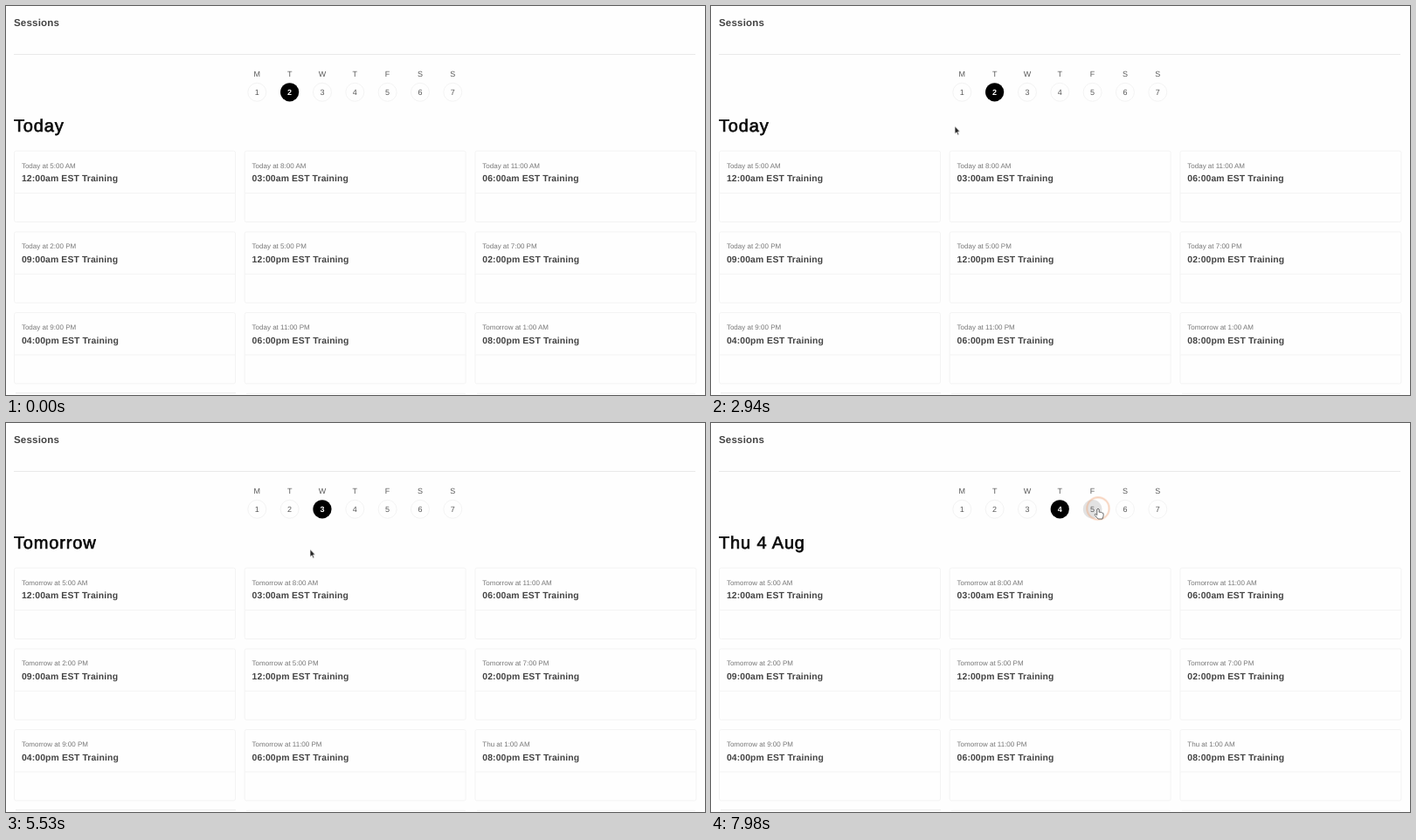
Write an HTML page that moves like this. It is 800x446 px and loops after 8 s.

```html
<!DOCTYPE html>
<html lang="en">
<head>
<meta charset="utf-8">
<title>Sessions</title>
<style>
html, body { margin: 0; width: 100%; height: 100%; overflow: hidden; background: #fefefe; }
svg {
  display: block; width: 100vw; height: 100vh;
  font-family: "Liberation Sans", Arial, sans-serif; text-rendering: geometricPrecision;
}
text { fill: currentColor; }
.title { font-size: 11.5px; font-weight: bold; letter-spacing: .2px; color: #444; }
.heading { font-size: 20px; letter-spacing: .85px; color: #0a0a0a; stroke: currentColor; stroke-width: .65px; }
.name { font-size: 10.4px; font-weight: bold; letter-spacing: .12px; color: #444; }
.time { font-size: 8px; color: #777; }
.day { font-size: 9px; color: #5a5a5a; text-anchor: middle; }
.on { font-weight: bold; color: #fff; }
.line { fill: none; stroke: #f3f3f3; }
.rule { stroke: #e9e9e9; }

/* One 8 s loop: 1% = 80 ms */
.show { animation: 8s step-end infinite; }
.today { animation-name: today; }
.tomorrow { animation-name: tomorrow; }
.thursday { animation-name: thursday; }
.early { animation-name: early; }
.late { animation-name: late; }
.arrow { animation-name: arrow; }
.hand { animation-name: hand; }
@keyframes today { 0% { opacity: 1 } 52.06%, to { opacity: 0 } }
@keyframes tomorrow { 0% { opacity: 0 } 52.06% { opacity: 1 } 78.31%, to { opacity: 0 } }
@keyframes thursday { 0% { opacity: 0 } 78.31%, to { opacity: 1 } }
@keyframes early { 0% { opacity: 1 } 61.2%, to { opacity: 0 } }
@keyframes late { 0% { opacity: 0 } 61.2%, to { opacity: 1 } }
@keyframes arrow {
  0% { opacity: 1 } 48.5% { opacity: 0 } 55% { opacity: 1 }
  75% { opacity: 0 } 80.9% { opacity: 1 } 97%, to { opacity: 0 }
}
@keyframes hand {
  0% { opacity: 0 } 48.5% { opacity: 1 } 55% { opacity: 0 }
  75% { opacity: 1 } 80.9% { opacity: 0 } 97%, to { opacity: 1 }
}

.hover { fill: #e2e2e2; opacity: 0; animation: 8s linear infinite; }
.hover3 { animation-name: hover3; }
.hover4 { animation-name: hover4; }
.hover5 { animation-name: hover5; }
@keyframes hover3 { 0%, 48.5% { opacity: 0 } 50%, 53% { opacity: 1 } 54%, to { opacity: 0 } }
@keyframes hover4 { 0%, 75% { opacity: 0 } 76.5%, 79% { opacity: 1 } 80%, to { opacity: 0 } }
@keyframes hover5 { 0%, 97% { opacity: 0 } 98.5%, to { opacity: 1 } }

.pointer { animation: move 8s ease-in-out infinite; }
@keyframes move {
  0%, 28.13% { transform: translate(230px, 460px) }
  36.75% { transform: translate(279px, 137.7px) }
  41.13%, 43.75% { transform: translate(300px, 128px) }
  49.88%, 54.25% { transform: translate(359.5px, 95.5px) }
  56.88%, 69.13% { transform: translate(348px, 144.7px) }
  76.13%, 79.63% { transform: translate(396px, 98px) }
  84.88%, 91.88% { transform: translate(410px, 146px) }
  98%, to { transform: translate(443px, 98px) }
}

.ring { fill: none; stroke: #f0a273; stroke-width: 1.8px; vector-effect: non-scaling-stroke; animation: ring 8s linear infinite; }
@keyframes ring {
  0%, 50.75% { transform: scale(.45); opacity: 0 }
  51.63% { transform: scale(.72); opacity: .5 }
  52.5%, 53.75% { transform: scale(1); opacity: .85 }
  55.13% { transform: scale(1); opacity: 0 }
  55.14%, 77% { transform: scale(.45); opacity: 0 }
  77.88% { transform: scale(.72); opacity: .5 }
  78.75%, 80% { transform: scale(1); opacity: .85 }
  81.38% { transform: scale(1); opacity: 0 }
  81.39%, 98.88% { transform: scale(.45); opacity: 0 }
  99.75%, to { transform: scale(.72); opacity: .5 }
}
</style>
</head>
<body>
<svg viewBox="0 0 800 446">
  <text class="title" x="9" y="22.7">Sessions</text>
  <path class="line rule" d="M9 55.5H789"/>
  <g id="week"></g>
  <text class="heading show today" x="9" y="143.5">Today</text>
  <text class="heading show tomorrow" x="9" y="143.5">Tomorrow</text>
  <text class="heading show thursday" x="9" y="143.5">Thu 4 Aug</text>
  <g id="cards"></g>
  <path class="line rule" d="M11 443.8H263"/>
  <path class="line" d="M275 444.3H526M539 444.3H789"/>
  <g class="pointer">
    <circle class="ring" r="17.6"/>
    <path class="show arrow" fill="#222" stroke="#fff" stroke-width=".7"
      d="M0 0V8.8L2 7L3.4 10.2L4.8 9.6L3.4 6.5H6Z"/>
    <path class="show hand" fill="#fff" stroke="#333" stroke-width=".7" stroke-linejoin="round"
      d="M-1.2 1Q0 -.8 1.2 1V4.3Q2.2 3.6 2.9 4.6Q3.9 4 4.6 5Q5.9 4.8 6.1 6V8.5L5 12H0L-3.8 7.4Q-3.6 5.9 -2.4 6.5L-1.2 7.6Z"/>
  </g>
</svg>
<script>
const label = (cls, x, y, str) => `<text class="${cls}" x="${x}" y="${y}">${str}</text>`;
const disc = (cls, x, r) => `<circle class="${cls}" cx="${x}" cy="98.8" r="${r}"/>`;

const picked = { 2: "today", 3: "tomorrow", 4: "thursday" };
week.innerHTML = [..."MTWTFSS"].map((letter, i) => {
  const n = i + 1, x = 287.3 + i * 37.33;
  const hover = n > 2 && n < 6 ? disc(`hover hover${n}`, x, 10.7) : "";
  const active = picked[n]
    ? `<g class="show ${picked[n]}">${disc("", x, 10.6)}${label("day on", x, 101.9, n)}</g>` : "";
  return label("day", x, 81.4, letter) + disc("line", x, 10.5) + hover
    + label("day", x, 101.8, n) + active;
}).join("");

const sessions = [
  ["5:00 AM", "12:00am"], ["8:00 AM", "03:00am"], ["11:00 AM", "06:00am"],
  ["2:00 PM", "09:00am"], ["5:00 PM", "12:00pm"], ["7:00 PM", "02:00pm"],
  ["9:00 PM", "04:00pm"], ["11:00 PM", "06:00pm"], ["1:00 AM", "08:00pm"]
];
cards.innerHTML = sessions.map(([time, name], i) => {
  const x = 9.5 + i % 3 * 263.7, y = 166.2 + Math.floor(i / 3) * 92.7;
  const [first, next] = i === 8 ? ["Tomorrow", "Thu"] : ["Today", "Tomorrow"];
  return `<rect class="line" x="${x}" y="${y}" width="253" height="81.4" rx="2"/>`
    + `<path class="line" d="M${x} ${y + 48.4}h253"/>`
    + label("time show early", x + 8.4, y + 19.5, `${first} at ${time}`)
    + label("time show late", x + 8.4, y + 19.5, `${next} at ${time}`)
    + label("name", x + 8.4, y + 35.2, `${name} EST Training`);
}).join("");
</script>
</body>
</html>
```
